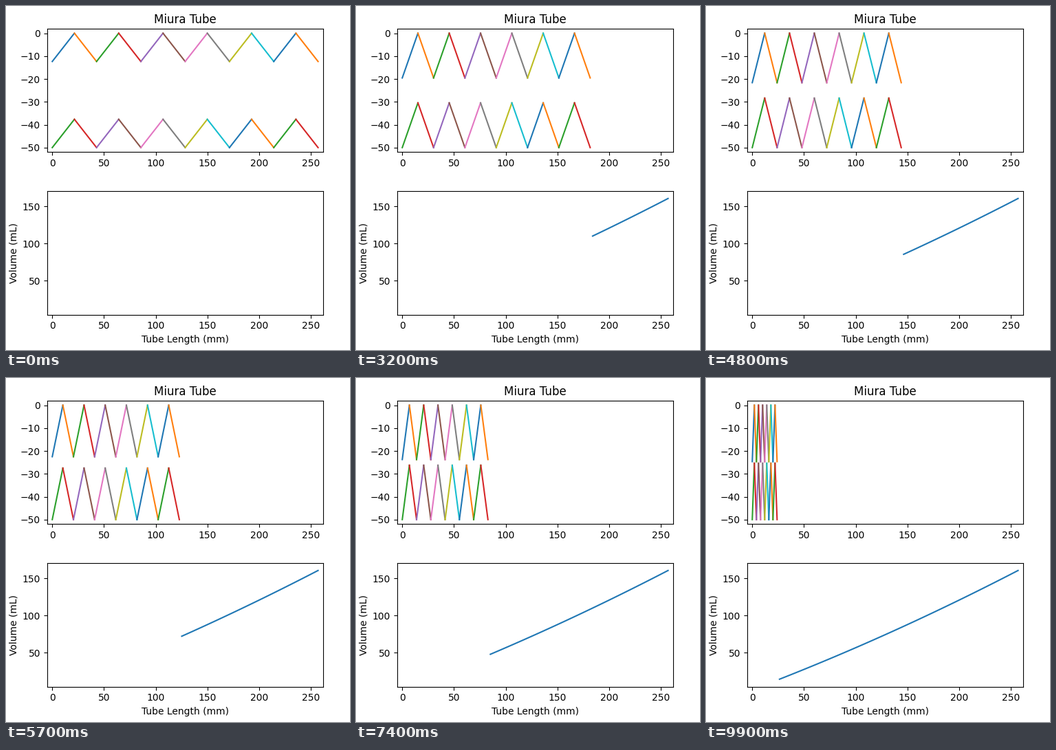
A matplotlib script that plays this animation: 500 px wide and 500 px high, repeating every 10 s.

```python
import numpy as np
import matplotlib.pyplot as plt
from matplotlib.animation import FuncAnimation

SIZE = 500
FRAMES = 100
FOLDS = 12
DEPTH = 50
LENGTHS = np.linspace(257, 24, FRAMES)
PANEL = LENGTHS[0] / FOLDS / np.cos(np.pi / 6)
VOLUMES = LENGTHS * (0.5285 + 0.000374 * LENGTHS)

fig = plt.figure(figsize=(SIZE / 100, SIZE / 100), dpi=100, facecolor="white")


def add_axes(top, height=179.57, left=59.73, right=461.1):
    """Place axes by pixel position measured from the top left."""
    return fig.add_axes([left / SIZE, 1 - (top + height) / SIZE,
                         (right - left) / SIZE, height / SIZE])


tube = add_axes(32.88)
tube.set(title="Miura Tube", xlim=(-5, 262), ylim=(-52, 2),
         xticks=range(0, 251, 50), yticks=range(-50, 1, 10))

chart = add_axes(269)
chart.set(xlabel="Tube Length (mm)", ylabel="Volume (mL)",
          xlim=(-5, 262), ylim=(4.2, 170.5),
          xticks=range(0, 251, 50), yticks=(50, 100, 150))

upper = [tube.plot([], [], color=f"C{i % 10}")[0] for i in range(FOLDS)]
lower = [tube.plot([], [], color=f"C{(i + FOLDS) % 10}")[0] for i in range(FOLDS)]
curve, = chart.plot([], [], color="C0")


def zigzag(lines, base, width, rise):
    for i, line in enumerate(lines):
        ends = [base + rise * (i % 2), base + rise * ((i + 1) % 2)]
        line.set_data([i * width, (i + 1) * width], ends)


def update(n):
    width = LENGTHS[n] / FOLDS
    rise = np.sqrt(PANEL ** 2 - width ** 2)
    zigzag(upper, -rise, width, rise)
    zigzag(lower, -DEPTH, width, rise)
    # the curve trails the fold by one step
    shown = n if n > 1 else 0
    curve.set_data(LENGTHS[:shown], VOLUMES[:shown])
    return [*upper, *lower, curve]


anim = FuncAnimation(fig, update, frames=FRAMES, interval=100,
                     init_func=lambda: update(0), repeat=True, repeat_delay=0)
plt.show()
```
